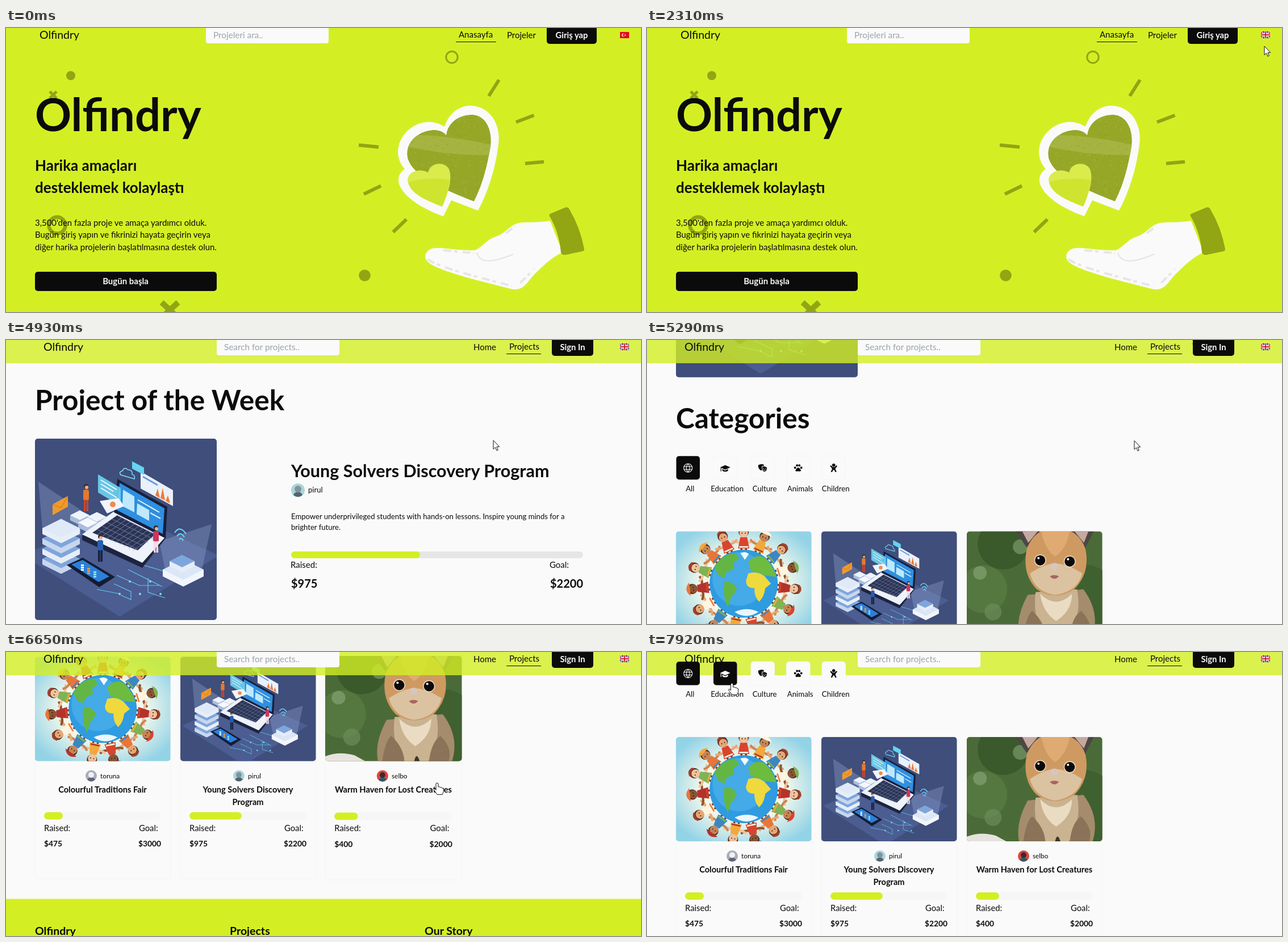
An HTML page that plays this animation: 1118 px wide and 501 px high, repeating every 7.99 s.

```html
<!DOCTYPE html>
<html lang="en">
<head>
<meta charset="utf-8">
<title>Donation site tour</title>
<style>
html, body { margin: 0; width: 100%; height: 100%; overflow: hidden; background: #fafafa }
svg { display: block; width: 1118px; height: 501px; font-family: Lato, Inter, sans-serif }
</style>
</head>
<body>
<svg id="stage" viewBox="0 0 1118 501"></svg>
<script>
const LIME = '#d3ef24', OLIVE = '#92a513', INK = '#0b0b0b', PAPER = '#fafafa';
const BRAND = 'Olfindry';
const LOOP = 7990;

const text = (x, y, size, str, weight = 400, anchor = 'start', fill = INK) =>
  `<text x="${x}" y="${y}" font-size="${size}" font-weight="${weight}" text-anchor="${anchor}" fill="${fill}">${str}</text>`;
const rect = (x, y, w, h, fill, r = 0, more = '') =>
  `<rect x="${x}" y="${y}" width="${w}" height="${h}" rx="${r}" fill="${fill}" ${more}/>`;
const circle = (x, y, r, fill, more = '') => `<circle cx="${x}" cy="${y}" r="${r}" fill="${fill}" ${more}/>`;
const path = (d, fill = 'none', more = '') => `<path d="${d}" fill="${fill}" ${more}/>`;
const line = (d, stroke, w = 1, more = '') => path(d, 'none', `stroke="${stroke}" stroke-width="${w}" ${more}`);
const group = (inner, more = '') => `<g ${more}>${inner}</g>`;
const repeat = (n, f) => Array.from({ length: n }, (_, i) => f(i)).join('');

let seed = 7;
const random = () => (seed = seed * 16807 % 2147483647) / 2147483647;

// Header
const navbar = n => text(n.logo, 19, 19.5, BRAND)
  + rect(n.search, -8, 216, 35, PAPER, 4) + text(n.search + 13, 18, 15.3, n.hint, 400, 'start', '#9ca3af')
  + n.links.map(([x, label], i) => text(x, i === n.active ? 17 : 18, 15, label)).join('')
  + rect(n.under[0], 24, n.under[1] - n.under[0], 1, INK)
  + rect(n.button[0], -8, n.button[1] - n.button[0], 36, INK, 5)
  + text((n.button[0] + n.button[1]) / 2, 18, 14.8, n.login, 700, 'middle', PAPER);

const navTr = navbar({ logo: 59, search: 352, hint: 'Projeleri ara..', active: 0,
  links: [[797, 'Anasayfa'], [882, 'Projeler']], under: [792, 863], button: [952, 1040], login: 'Giriş yap' });
const english = { logo: 66, search: 371, hint: 'Search for projects..', button: [961, 1034], login: 'Sign In' };
const navHome = navbar({ ...english, active: 0, links: [[828, 'Home'], [890, 'Projects']], under: [823, 871] });
const navProjects = navbar({ ...english, active: 1, links: [[823, 'Home'], [886, 'Projects']], under: [881, 942] });

const flagTr = rect(1081, 7, 16, 11, '#e30a17') + circle(1087, 12.5, 2.8, '#fff') + circle(1087.8, 12.5, 2.2, '#e30a17')
  + circle(1090.5, 12.5, 1, '#fff');
const flagUk = rect(1081, 6, 16, 12, '#1c2c6e') + line('M1081,6l16,12M1097,6l-16,12', '#fff', 2.4)
  + line('M1081,6l16,12M1097,6l-16,12', '#d01c36', .9) + line('M1089,6v12M1081,12h16', '#fff', 4)
  + line('M1089,6v12M1081,12h16', '#d01c36', 2.2);

// Landing page
const bigHeart = 'M775,189C768,178 745,177 728,187C708,198 701,220 710,237C722,264 782,290 824,306C840,275 848,240 853,210C857,185 848,155 822,153C800,152 778,165 775,189Z';
const specks = repeat(330, () => {
  const y = 155 + random() ** 1.3 * 145;
  return rect((700 + random() * 155).toFixed(1), y.toFixed(1), (1 + random() * 2.5).toFixed(1), 1.3, random() < .6 ? '#b3c053' : '#84960f', 0, 'opacity=".5"');
});
const landingArt = line('M621,206.500L656,210M630,293L660,278.500M681.500,360L705,337.500M850,120L868,91.500M898,166L929.500,154M914,239L947,236', OLIVE, 6)
  + circle(114, 84, 8, OLIVE) + line('M77,112l12,12M89,112l-12,12', OLIVE, 5)
  + circle(90, 348, 14.5, 'none', `stroke="${OLIVE}" stroke-width="6.500"`)
  + circle(785, 51.5, 10.2, 'none', `stroke="${OLIVE}" stroke-width="3"`)
  + circle(631.5, 436.5, 10.3, OLIVE) + line('M274,484l30,28M303,484l-30,28', OLIVE, 10)
  + path('M772,174C780,150 798,137 818,137C852,138 872,170 867,205C862,250 846,295 831,322L784,304L770,332C740,322 700,300 692,275C688,262 696,252 702,249C692,238 688,222 691,210C697,178 737,152 772,174Z', PAPER)
  + `<clipPath id="heart"><path d="${bigHeart}"/></clipPath>`
  + group(path(bigHeart, '#96a728') + path('M700,190Q760,185 860,207V224Q780,226 700,208Z', '#abba4a', 'opacity=".7"') + specks, 'clip-path="url(#heart)"')
  + path('M743,255C730,247 708,252 707,268C710,292 745,306 768,315C776,298 786,270 781,252C777,236 748,234 743,255Z', '#d9ec4c')
  + path('M708,272Q740,262 781,268Q776,298 768,315C745,306 712,294 708,272Z', '#cfe42f')
  + path('M958,340C930,344 925,342 910,343C885,345 885,360 862,368C845,374 840,385 826,392C800,393 775,388 758,388C740,388 733,403 742,412C760,430 850,450 892,461C915,463 918,445 935,430C950,415 965,402 980,396Z', PAPER)
  + line('M829,396C834,418 862,412 893,399', '#e4e4e4', 2)
  + line('M742,408C765,424 850,444 890,455M905,450L930,425M770,392L824,397M880,362L896,350', '#e6e6e6', 4, 'stroke-dasharray="14 5 6 9"')
  + path('M957,332Q955,328 960,327L985,316.500Q990,315 992,320Q1011,352 1018,390Q1018,394 1014,394L986,400Q978,401 977,396Q974,360 957,332Z', OLIVE);

const landing = (lead, body, button) => text(51, 182, 79.5, BRAND, 700)
  + lead.map((s, i) => text(51, 252 + 39 * i, 26, s, 700)).join('')
  + body.map((s, i) => text(51, 349 + 21.4 * i, 14.9, s)).join('')
  + rect(51, 430, 320, 34, INK, 5) + text(210.5, 452, 15, button, 700, 'middle', PAPER);

// Pictures, each centred on 0,0
const person = (x, y, top, legs, skin = '#e9b48f') => group(
  circle(0, -24, 4, '#4a2a22') + circle(1, -22, 3, skin) + rect(-5, -18, 10, 19, top, 3)
  + rect(-4, 0, 3.5, 20, legs) + rect(.5, 0, 3.5, 20, legs), `transform="translate(${x} ${y})"`);
const slab = (x, y, w, h, top, side) => path(`M${x - w},${y}v${h}L${x},${y + w / 2 + h}L${x + w},${y + h}v${-h}Z`, side)
  + path(`M${x - w},${y}L${x},${y - w / 2}L${x + w},${y}L${x},${y + w / 2}Z`, top);

const techArt = group(rect(0, 150, 430, 370, '#3f4e7b')
  + path('M30,380L200,300L375,380L200,488Z', '#5468a0', 'opacity=".6"')
  + path('M57,250L132,300V345H65ZM270,355L362,325L345,405H280Z', '#9fb4dc', 'opacity=".3"')
  + line('M195,415l40,18h35M215,405l60,30M190,430l30,14v14l-18,-8M235,395l50,15M160,440l42,8M250,420v25l30,10', '#5ec8ee', 1.2)
  + repeat(5, i => circle(200 + i * 18, 448 - i % 2 * 22, 2, '#7fdcf6'))
  + repeat(4, i => slab(97, 386 - i * 18, 33, 10, i === 3 ? '#dfe9f7' : '#7fa6dc', i % 2 ? '#e8eef8' : '#c8d7ee'))
  + path('M82,290l27,-15v19l-27,15Z', '#f0992e') + line('M82,290l15,6 12,-21', '#c97314')
  + slab(130, 309, 17, 9, '#eef3fb', '#a9bddd') + slab(160, 312, 17, 9, '#eef3fb', '#a9bddd') + slab(144, 322, 17, 9, '#f6f8fd', '#a9bddd')
  + path('M134,345L192,303L281,350L240,402L134,353Z', '#1c2440') + path('M134,343L192,301L281,347L240,393Z', '#eef2fa')
  + path('M152,340L196,309L262,343L232,371Z', '#2a3354')
  + repeat(5, i => line(`M${160 + i * 9},${334 - i * 6}l72,35`, '#8090b4', .8))
  + repeat(9, i => line(`M${160 + i * 8},${344 + i * 3.4}l43,-30`, '#8090b4', .8))
  + path('M196,245L284,294L281,350L190,304Z', '#171f3c') + path('M200,252L279,297L276,342L195,300Z', '#2f8fe0')
  + path('M206,264L226,276V304L205,293ZM231,288L252,300V319L230,307Z', '#bfe9fb') + line('M232,282l38,22M254,305l18,10', '#dff5ff', 2)
  + path('M162,237L202,261V293L162,269Z', '#6fd3f1', 'opacity=".9"') + line('M167,247l28,17M167,254l22,13M167,261l28,17', '#fff', 1.5)
  + path('M165,284L198,279L208,293L178,306Z', '#f1f4fb') + circle(188, 290, 5, '#ef8a4a')
  + path('M237,232L294,265V293L237,262Z', '#eaf1fb') + line('M241,241l26,15', '#6f9be0', 3)
  + path('M263,274l4,-12 4,17ZM272,279l4,-18 4,22ZM281,284l4,-10 4,14Z', '#ee7a35')
  + path('M222,214L243,225V238L222,227Z', '#65d4f0')
  + line('M202,238q-4,-6 3,-7q3,-8 10,-2q8,0 7,8q6,2 4,8Z', '#79dcf5', 1.6)
  + path('M107,397L135,384L192,418L164,436Z', '#141b33') + path('M115,396L135,388L182,417L163,427Z', '#2c80d8')
  + repeat(9, i => rect(132 + i % 3 * 11, 396 + i % 3 * 6 + (i / 3 | 0) * 4, 5, 3, ['#fff', '#f29a3b', '#8fe0f6'][i % 3]))
  + slab(312, 405, 36, 12, '#dbe6f6', '#f2f5fb') + slab(310, 390, 22, 9, '#7fa6dc', '#e6edf8')
  + line('M297,340q9,-14 20,2M301,346q7,-9 13,2M305,352q4,-5 7,2', '#67d2f0', 2.2)
  + person(141, 282, '#e27a2c', '#c9452c') + person(166, 371, '#255fb4', '#17203d') + person(264, 355, '#d0345e', '#f2d9e0'),
  'transform="translate(-211 -334)"');

const coats = ['#d9442e', '#f2a93b', '#3c87bf', '#fff4e0', '#b5322c', '#7fb353', '#e8763a'];
const skins = ['#f3c19a', '#c98555', '#e6a774', '#8d5433'];
const doll = i => group(line('M-21,-76Q-10,-69 0,-77Q10,-69 21,-76', skins[i % 4], 4)
  + path('M-6,-82L-10,-62H10L6,-82Z', coats[i % 7]) + rect(-8, -66, 16, 2.5, coats[(i + 3) % 7])
  + line('M-4,-62v6M4,-62v6', '#6b3a25', 3.5)
  + circle(0, -91, 9, '#4b2b1f') + circle(0, -89, 7.5, skins[i % 4])
  + circle(-2.8, -89, 1, '#222') + circle(2.8, -89, 1, '#222')
  + (i % 2 ? path('M-12,-95Q0,-108 12,-95Z', coats[(i + 2) % 7]) : path('M-8,-94Q0,-101 8,-94V-98Q0,-106 -8,-98Z', '#a5402b')),
  `transform="rotate(${i * 24})"`);
const globeArt = `<radialGradient id="sky" r=".6"><stop offset=".5" stop-color="#f4f8ec"/><stop offset="1" stop-color="#93d3e6"/></radialGradient>`
  + rect(-120, -93, 240, 186, 'url(#sky)') + repeat(15, doll) + circle(0, 0, 60, '#2f9be0') + circle(-8, -8, 47, '#53b5ee', 'opacity=".6"')
  + path('M-52,-29Q-38,-52 -15,-54L-8,-44L-19,-36L-16,-27L-30,-20L-34,-10L-44,-14ZM-34,-4Q-18,-4 -12,8Q-16,18 -22,24L-28,42Q-38,20 -34,-4Z', '#63b644')
  + path('M8,-38Q24,-56 40,-43Q54,-28 57,-12L40,-14L22,-20L12,-24Z', '#6dbb3f')
  + path('M8,-18Q28,-24 41,-8L48,0L38,8Q36,24 27,32Q18,22 19,8Q4,8 4,-5Z', '#f0d93c') + path('M-16,50Q6,40 26,50Q4,64 -16,50Z', '#eaf7fb')
  + path('M-6,-54Q4,-58 9,-52L2,-42Z', '#f2fafc');

const petArt = rect(-120, -93, 240, 186, '#4a6b38')
  + circle(-55, -70, 45, '#3a5a2c') + circle(-90, 10, 42, '#54783f') + circle(80, 40, 75, '#3f602f')
  + circle(-25, -65, 13, '#7d9a6b', 'opacity=".7"') + circle(-96, -19, 12, '#84a272', 'opacity=".7"') + circle(-73, 50, 15, '#6c8c59', 'opacity=".7"')
  + path('M-120,93V84Q-95,74 -68,82L-48,93Z', '#e6e3dc')
  + path('M-12,20Q-34,60 -27,93H102Q116,50 86,10Z', '#a58c6c')
  + path('M2,15Q-4,60 18,93H60Q84,55 75,10Z', '#c9b391') + path('M10,18Q38,46 66,18Q66,48 38,66Q14,50 10,18Z', '#eadcc2')
  + path('M-20,93Q-14,55 -4,48Q18,68 19,93ZM62,93Q66,58 82,48Q104,70 96,93Z', '#8a7358') + path('M36,93Q40,74 46,93Z', '#40352a')
  + path('M-35,-95L-14,-64L12,-95ZM106,-95L89,-62L62,-95Z', '#4d4743') + path('M-23,-95L-11,-72L8,-95ZM96,-95L87,-72L68,-95Z', '#c5a9a0')
  + path('M-14,-60Q0,-98 36,-98Q78,-98 90,-60Q98,-18 70,10Q36,32 4,10Q-22,-16 -14,-60Z', '#cf9a62')
  + path('M12,-93Q36,-100 62,-93Q56,-60 36,-48Q18,-60 12,-93Z', '#dfab72')
  + path('M-8,-18Q16,-34 36,-36Q60,-34 84,-18Q76,14 36,20Q0,14 -8,-18Z', '#dbc3a2')
  + circle(10, -41, 10.5, '#f0dcbd') + circle(62, -39, 10.5, '#f0dcbd') + circle(10, -41, 9, '#0c0a0a') + circle(62, -39, 9, '#0c0a0a')
  + circle(7, -45, 2, '#fff') + circle(59, -43, 2, '#fff')
  + path('M28,-34Q35,-39 42,-34Q41,-26 35,-24Q29,-26 28,-34Z', '#d5c6c0') + path('M27,-13Q35,-17 43,-13Q35,-4 27,-13Z', '#a9655f');

const avatar = (x, y, r, back, hair, body) => group(circle(0, 0, 12, back)
  + path('M-8,8.500Q-6,3 0,3Q6,3 8,8.500Q0,15 -8,8.500Z', body) + circle(0, -2, 6, hair), `transform="translate(${x} ${y}) scale(${r / 12})"`);
const avatars = [['#a9adba', '#f1f1f4', '#5d6477'], ['#a9d6dc', '#84939b', '#51656f'], ['#e0473f', '#3d2b2b', '#2d5870']];

// Projects page, in document coordinates
const TOP = 528;
const clip = (id, x, y, w, h) => `<clipPath id="${id}"><rect x="${x}" y="${y}" width="${w}" height="${h}" rx="5"/></clipPath>`;
const picture = (id, art, x, y, w, h, k) => clip(id, x, y, w, h)
  + group(group(art, `transform="translate(${x + w / 2} ${y + h / 2}) scale(${k})"`), `clip-path="url(#${id})"`);

const feature = text(51, 124, 49.5, 'Project of the Week', 700)
  + picture('week', techArt, 51, 174, 320, 320, 1)
  + text(502, 242, 30.5, 'Young Solvers Discovery Program', 700)
  + avatar(514, 265, 12, ...avatars[1]) + text(532, 269, 13, 'pirul')
  + text(502, 316, 13.1, 'Empower underprivileged students with hands-on lessons. Inspire young minds for a')
  + text(502, 335, 13.1, 'brighter future.')
  + rect(502, 373, 514, 12, '#e6e6e6', 6) + rect(502, 373, 227, 12, LIME, 6)
  + text(501, 402, 15, 'Raised:') + text(957, 402, 15, 'Goal:')
  + text(502, 437, 20, '$975', 700) + text(1016, 437, 20, '$2200', 700, 'end');

const cards = [
  { art: globeArt, k: 1, user: 'toruna', ax: 99, title: ['Colourful Traditions Fair'], raised: 475, goal: 3000, fill: 33 },
  { art: techArt, k: .64, user: 'pirul', ax: 103, title: ['Young Solvers Discovery', 'Program'], raised: 975, goal: 2200, fill: 92 },
  { art: petArt, k: 1, user: 'selbo', ax: 100, title: ['Warm Haven for Lost Creatures'], raised: 400, goal: 2000, fill: 41 }
];
const card = (c, i) => group(rect(0, 0, 239, 392, PAPER, 5, 'stroke="#f3f4f3"')
  + picture('card' + i, c.art, 0, 0, 238.5, 184, c.k)
  + avatar(c.ax, 210, 10, ...avatars[i]) + text(c.ax + 16, 214, 11.8, c.user)
  + c.title.map((s, j) => text(119, 239 + 22 * j, 14.6, s, 700, 'middle')).join('')
  + rect(16, 274, 206, 13, '#f6f6f6', 6.5) + rect(16, 274, c.fill, 13, LIME, 6.5)
  + text(16, 307, 14.8, 'Raised:') + text(183, 307, 14.8, 'Goal:')
  + text(16, 334, 13.8, '$' + c.raised, 700) + text(222, 334, 13.8, '$' + c.goal, 700, 'end'), `id="c${i}"`);

const footer = rect(0, TOP + 665, 1118, 300, LIME)
  + [[51, BRAND], [394, 'Projects'], [737, 'Our Story']].map(([x, s]) => text(x, TOP + 728, 19.5, s, 700)).join('');

const icons = [
  c => line('M-7.500,0a7.500,7.500 0 1 0 15,0a7.500,7.500 0 1 0 -15,0M-7,-2.500h14M-7,2.500h14M0,-7.500q-6,7.500 0,15q6,-7.500 0,-15', c, 1.1),
  c => path('M-9,-1L0,-5L9,-1L0,3ZM-5,2L0,4.500L5,2V5Q0,8 -5,5Z', c) + line('M-7.500,0v6', c, 1.2),
  c => path('M-8,-5Q-3,-8 2,-6V0Q0,5 -4,4Q-8,1 -8,-5Z', c) + path('M-1,-3Q4,-4 8,-1Q8,6 3,7Q-2,6 -1,-3Z', c, 'stroke="#fafafa"') + line('M1,1h1.500M4.500,1.500h1.500M1,4q2,-1 3.500,.5', PAPER, 1),
  c => path('M0,-1Q4,1 5,5Q3,7 0,5.500Q-3,7 -5,5Q-4,1 0,-1Z', c) + [[-5.5, -.5], [-2, -4.5], [2, -4.5], [5.5, -.5]].map(p => circle(...p, 1.9, c)).join(''),
  c => circle(0, -5, 2.8, c) + line('M-5.500,-4L-2,0H2L5.500,-4M-2,3L-4,7M2,3L4,7', c, 2.4) + rect(-3, -1.5, 6, 5, c, 1)
];
const tileX = [51.5, 117, 183, 245.5, 308], labels = ['All', 'Education', 'Culture', 'Animals', 'Children'];
const tile = (i, on) => rect(tileX[i], TOP + 105, 41.5, 41.5, on ? INK : PAPER, 5, on ? '' : 'stroke="#f3f5f3"')
  + group(icons[i](on ? PAPER : INK), `transform="translate(${tileX[i] + 20.700} ${TOP + 126})"`);
const tiles = labels.map((s, i) => tile(i, !i) + text(tileX[i] + 24.2, TOP + 167, 13.2, s, 400, 'middle')).join('')
  + group(tile(1, true), 'id="lit"');

document.getElementById('stage').innerHTML =
  group(rect(0, 0, 1118, 501, LIME) + landingArt
    + group(navTr + landing(['Harika amaçları', 'desteklemek kolaylaştı'],
      ["3,500'den fazla proje ve amaça yardımcı olduk.", 'Bugün giriş yapın ve fikrinizi hayata geçirin veya', 'diğer harika projelerin başlatılmasına destek olun.'], 'Bugün başla'), 'id="tr"')
    + group(navHome + landing(['Supporting great causes', 'made easy'],
      ['We helped over 3,500 projects and causes. Sign in', 'today and get your idea kicked off or support others', 'kick off their amazing projects.'], 'Start Today'), 'id="en"'), 'id="home"')
  + group(rect(0, 0, 1118, 501, PAPER)
    + group(feature + text(51, TOP + 56, 49.5, 'Categories', 700) + cards.map(card).join('') + footer, 'id="page"')
    + rect(0, 0, 1118, 41, LIME, 0, 'id="bar"') + group(tiles, 'id="tiles"') + navProjects, 'id="projects"')
  + group(flagTr, 'id="flagTr"') + group(flagUk, 'id="flagUk"')
  + group(path('M0,0V15.500L3.500,12.300L6,18L8.300,17L5.900,11.300H10.700Z', '#fff', 'id="arrow"')
    + path('M-2,2a2,2 0 0 1 4,0v5q3,-1 3.500,1q3,-1 3.200,1q2.500,-.5 2.500,2v4.500l-2,5h-9l-5,-7q-2,-3 .3,-3.300l2.500,2.300Z', '#fff', 'id="hand"'),
    'id="cursor" stroke="#111" stroke-linejoin="round"');

// Motion
const $ = Object.fromEntries([...document.querySelectorAll('#stage [id]')].map(e => [e.id, e]));
const show = (id, on) => $[id].style.display = on ? '' : 'none';
const ease = (t, a, b) => { const u = Math.min(1, Math.max(0, (t - a) / (b - a))); return u * u * (3 - 2 * u); };
const within = (t, ...spans) => spans.some(([a, b]) => t >= a && t < b);

const track = [[390, 1064, 470], [800, 1076, 200], [1150, 1088, 18], [1220, 1088, 18], [1350, 1089, 5], [1480, 1089, 16],
  [1680, 1089, 16], [1890, 1088, 34], [2160, 1088, 34], [2240, 1083, 33], [2310, 1087, 32], [2910, 1087, 32], [3380, 966, 30],
  [3660, 912, 13], [4730, 912, 13], [4930, 858, 177], [6090, 858, 179], [6400, 858, 179], [6520, 818, 205], [6640, 759, 231],
  [6910, 759, 231], [7130, 430, 230], [7330, 200, 190], [7480, 64, 113], [7550, 92, 90], [7670, 148, 57], [7720, 148, 57], [7920, 149.5, 55]];
function cursorAt(t) {
  const i = track.findIndex(k => k[0] > t);
  if (i < 1) return track.at(i).slice(1);
  const [a, x, y] = track[i - 1], [b, u, v] = track[i], f = (t - a) / (b - a);
  return [x + (u - x) * f, y + (v - y) * f];
}

const hovers = [[7240, 7380], [7040, 7230], [6600, 6960]];

function frame(now) {
  const t = now % LOOP;
  show('home', t < 3730);
  show('projects', t >= 3730);
  show('tr', t < 2980);
  show('en', t >= 2980);
  show('flagTr', t < 2160);
  show('flagUk', t >= 2160);

  const scroll = 528 * ease(t, 4930, 5430) + 264 * ease(t, 6120, 6440) - 176 * ease(t, 6580, 6830);
  for (const id of ['page', 'tiles']) $[id].setAttribute('transform', `translate(0 ${-scroll})`);
  $.bar.setAttribute('opacity', scroll > 0 ? .8 : 1);
  show('lit', t >= 7640);

  hovers.forEach(([a, b], i) => {
    const k = 1 + .05 * (ease(t, a, a + 200) - ease(t, b, b + 200));
    $['c' + i].setAttribute('transform', `translate(${51 + 256 * i + 119.5} ${TOP + 434}) scale(${k}) translate(-119.500 -196)`);
  });

  const hand = within(t, [1150, 1750], [3560, 4770], [6600, 7390], [7700, LOOP]);
  show('cursor', t >= 390);
  show('hand', hand);
  show('arrow', !hand);
  $.cursor.setAttribute('transform', `translate(${cursorAt(t).join(' ')})`);
  requestAnimationFrame(frame);
}
requestAnimationFrame(frame);
</script>
</body>
</html>
```
